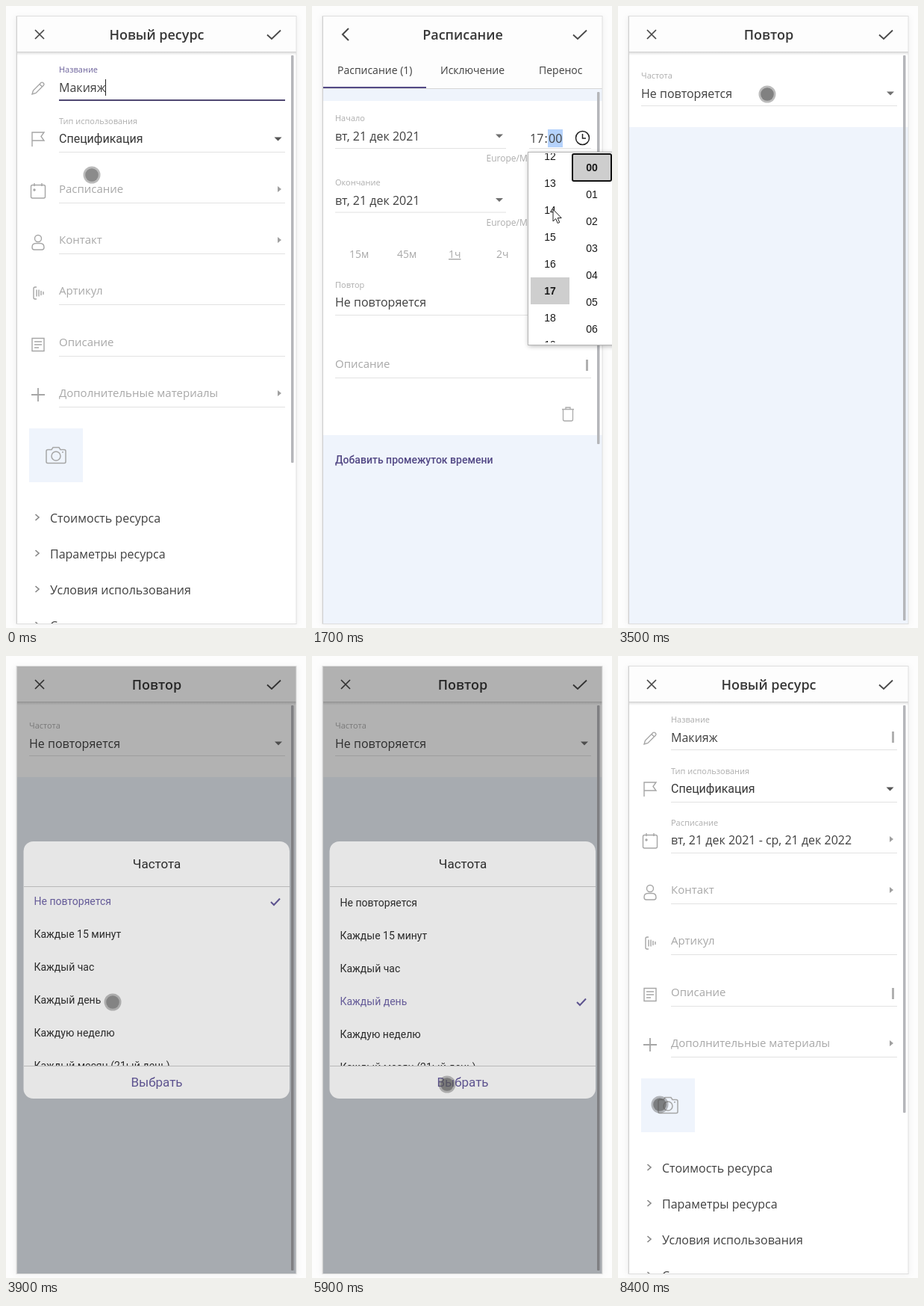
An HTML page that plays this animation: 402 px wide and 832 px high, repeating every 8600 ms.

```html
<!DOCTYPE html>
<html lang="ru">
<head>
<meta charset="utf-8">
<style>
html, body { margin: 0; width: 100%; height: 100%; overflow: hidden; background: #fdfdfd; }
svg { display: block; width: 402px; height: 832px; }
text { white-space: pre; }
</style>
</head>
<body>
<svg id="stage" viewBox="0 0 402 832">
  <defs>
    <clipPath id="card"><rect x="14" y="14" width="375" height="812"/></clipPath>
    <clipPath id="list"><rect x="24" y="309" width="356" height="239"/></clipPath>
    <linearGradient id="fade" x2="0" y2="1">
      <stop offset="0" stop-color="#000" stop-opacity=".12"/>
      <stop offset="1" stop-color="#000" stop-opacity="0"/>
    </linearGradient>
    <filter id="soft" x="-20%" y="-20%" width="140%" height="140%"><feGaussianBlur stdDeviation="5"/></filter>
    <filter id="drop" x="-20%" y="-20%" width="140%" height="140%"><feGaussianBlur stdDeviation="3"/></filter>
  </defs>
  <rect x="12" y="14" width="379" height="814" fill="#000" opacity=".045" filter="url(#soft)"/>
  <g id="scene"></g>
</svg>
<script>
const LOOP = 8600, STEP = 100;
const scene = document.getElementById('scene');
const OPEN = "'Open Sans', sans-serif", ROBOTO = 'Roboto, sans-serif', ARIAL = "'Liberation Sans', Arial, sans-serif";
const INK = '#404040', MUTED = '#a8a8a8', LABEL = '#adadad', ICON = '#a6a6a6', RULE = '#e2e2e2';
const PURPLE = '#524885', PALE = '#eff4fc';

// ---- drawing helpers ----
const rect = (x, y, w, h, fill, more = '') => `<rect x="${x}" y="${y}" width="${w}" height="${h}" fill="${fill}" ${more}/>`;
const path = (d, color, width = 1.4, more = '') =>
  `<path d="${d}" fill="none" stroke="${color}" stroke-width="${width}" ${more}/>`;
const shape = (d, fill) => `<path d="${d}" fill="${fill}"/>`;
const text = (x, y, s, size = 16, fill = INK, font = OPEN, more = '') =>
  `<text x="${x}" y="${y}" font-size="${size}" fill="${fill}" font-family="${font}" ${more}>${s}</text>`;
const mid = 'text-anchor="middle"';
const rule = (y, x1 = 71, x2 = 374) => rect(x1, y, x2 - x1, 1, RULE);
const label = (x, y, s, fill = LABEL) => text(x, y, s, 11, fill);
const down = (x, y, fill = '#707070') => shape(`M${x - 5} ${y - 2.5}h10l-5 5z`, fill);
const right = y => shape(`M364 ${y - 4}l5 4l-5 4z`, '#a0a0a0');
const bar = y => rect(367, y, 3, 15, '#b0b0b0');
const scrollbar = (y1, y2) => rect(382, y1, 3.5, y2 - y1, '#b5b6ba', 'rx="1"');
const at = (x, y, body) => `<g transform="translate(${x} ${y})">${body}</g>`;

// Linear interpolation through [time, value, value...] keys
function track(keys, t) {
  let i = keys.findIndex(k => k[0] > t);
  if (i < 0) return keys[keys.length - 1].slice(1);
  if (i === 0) return keys[0].slice(1);
  const a = keys[i - 1], b = keys[i], p = (t - a[0]) / (b[0] - a[0]);
  return a.slice(1).map((v, n) => v + (b[n + 1] - v) * p);
}

function header(title, back) {
  const left = back ? 'M49 30L41 38L49 46' : 'M39 32L51 44M51 32L39 44';
  return rect(14, 14, 375, 48, '#fdfdfd') +
    path(left, '#484848', back ? 2 : 1.7) +
    path('M350 38.5L356 44L368 32.5', '#484848', 1.8) +
    text(202, 45, title, 18, '#383838', OPEN, 'font-weight="600" ' + mid);
}
const headerEdge = () => rect(14, 61, 375, 1, '#d2d2d2') + rect(14, 62, 375, 4, 'url(#fade)');

// ---- icons, drawn around 0,0 ----
const icons = {
  pencil: path('M-8 8L-6.5 3L4 -7.5Q5.5 -8.5 7 -7L7.5 -6.500Q8.500 -5 7.500 -4L-3 6.500ZM2 -5.500L5.500 -2', ICON),
  flag: path('M-8 10V-9H8L4 -3.500L8 2H-8', ICON),
  calendar: path('M-7.500 -7.500H7.500Q9.500 -7.500 9.500 -5.500V8Q9.500 10 7.500 10H-7.500Q-9.500 10 -9.500 8V-5.500Q-9.500 -7.500 -7.500 -7.500ZM-5 -10V-6M5 -10V-6', ICON) +
    '<circle cx="-5" cy="-1" r="1.700" fill="#a6a6a6"/>',
  person: '<circle cy="-5" r="4.500" fill="none" stroke="#a6a6a6" stroke-width="1.4"/>' +
    path('M-8 7Q-8 1.500 -3 1.500H3Q8 1.500 8 7Q8 10 5 10H-5Q-8 10 -8 7Z', ICON),
  code: path('M-2 -8H-4Q-6 -8 -6 -6V6Q-6 8 -4 8H-2M-2 -4.500V4.500M1 -4.500V4.500M4 -3V3M7 -2V2', ICON),
  note: path('M-8 -8.500H8V8.500H-8ZM-5 -4H5M-5 0H5M-5 4H1', ICON),
  plus: path('M-9 0H9M0 -9V9', ICON, 1.8),
  camera: path('M-11 -7.500H-6L-4 -10.500H4L6 -7.500H11Q13 -7.500 13 -5.500V8.500Q13 10.500 11 10.500H-11Q-13 10.500 -13 8.500V-5.500Q-13 -7.500 -11 -7.500Z', ICON, 1.5) +
    '<circle cy="1" r="6" fill="none" stroke="#a6a6a6" stroke-width="1.5"/>' + rect(8, -5, 2, 1.5, ICON),
  trash: path('M-8 -6.500H8M-3 -6.500V-9H3V-6.500M-6.500 -6.500V7Q-6.500 9 -4.500 9H4.500Q6.500 9 6.500 7V-6.500', '#ababab', 1.3),
  clock: '<circle r="9" fill="none" stroke="#222" stroke-width="1.500"/>' + path('M0 -5.500V0.500H4.500', '#222', 1.5)
};

// ---- screens ----
function formScreen(filled) {
  let s = rect(14, 14, 375, 812, '#fff') + header('Новый ресурс') + headerEdge();
  const marks = { pencil: 110, flag: 178, calendar: 247, person: 316, code: 384, note: 453, plus: 520 };
  for (const k in marks) s += at(43, marks[k], icons[k]);

  s += label(71, 89, 'Название', filled ? LABEL : '#6d639c') + text(71, 115, 'Макияж');
  s += filled ? rule(125) + bar(101) + bar(444)
    : rect(71, 125, 303, 2, '#4f4772') + rect(133, 98, 1, 22, '#222');
  s += label(71, 158, 'Тип использования') + text(71, 183, 'Спецификация', 16, '#383838', ROBOTO) + down(364.5, 178, '#555');
  s += filled ? label(71, 227, 'Расписание') + text(71, 252, 'вт, 21 дек 2021 - ср, 21 дек 2022')
    : text(71, 250, 'Расписание', 15, MUTED);
  const blanks = { 'Контакт': 318, 'Артикул': 386, 'Описание': 455, 'Дополнительные материалы': 523 };
  for (const k in blanks) s += text(71, blanks[k], k, 15, MUTED);
  s += [195, 263, 331, 399, 468, 536].map(y => rule(y)).join('');
  s += [245, 313, 518].map(right).join('');

  s += rect(31, 565, 72, 72, PALE) + at(67, 601, icons.camera);
  ['Стоимость ресурса', 'Параметры ресурса', 'Условия использования', 'Состав'].forEach((name, i) => {
    const y = 685 + i * 48;
    s += path(`M39.500 ${y - 5}l4.500 4l-4.500 4`, '#868686', 1.6) + text(59, y + 5.5, name);
  });
  return s + scrollbar(66, 611);
}

const two = n => String(n).padStart(2, '0');

function timeRow(y, title, hour, lit) {
  let s = label(31, y - 20, title) + text(31, y + 6, 'вт, 21 дек 2021') + down(251, y);
  if (lit) s += rect(lit === 'h' ? 291 : 316, y - 9, 20, 24, '#b5d2fb');
  s += text(292, y + 8.5, two(hour)) + text(311.5, y + 8.5, ':') + text(317, y + 8.5, '00');
  s += at(362.5, y + 2.5, icons.clock) + rule(y + 16, 31, 260) + rule(y + 16, 291);
  return s + text(374, y + 34, 'Europe/Moscow (GMT+3)', 12, LABEL, OPEN, 'text-anchor="end"');
}

function scheduleScreen(o) {
  let s = rect(14, 14, 375, 812, PALE) + rect(14, 61, 375, 50, '#fdfdfd') + header('Расписание', true);
  s += text(34, 91, 'Расписание (1)', 14) + text(172, 91, 'Исключение', 14) + text(304, 91, 'Перенос', 14);
  s += rect(14, 110, 375, 1, '#d6d6d6') + rect(15, 108, 138, 2, PURPLE);
  s += rect(14, 127, 375, 447, '#fff');
  s += timeRow(174, 'Начало', o.start, o.litStart) + timeRow(259.5, 'Окончание', o.end, o.litEnd);
  [['15м', 50], ['45м', 114], ['1ч', 183], ['2ч', 247], ['Весь день', 303]].forEach(([name, x]) => {
    const line = name === '1ч' && o.end - o.start === 1 ? 'text-decoration="underline"' : '';
    s += text(x, 337, name, 14, MUTED, OPEN, line);
  });
  s += label(31, 377, 'Повтор') + text(31, 402, o.repeat) + right(395) + rule(413, 31);
  s += text(31, 484, 'Описание', 15, MUTED) + bar(473) + rule(497, 31) + at(343, 546, icons.trash);
  s += text(31, 612, 'Добавить промежуток времени', 14, PURPLE, ROBOTO, 'font-weight="500"');
  return s + scrollbar(115, o.picker ? 586 : 760);
}

function picker(top, hour, first, scroll, focus) {
  const cell = (x, n, y, on, ring) => {
    const frame = on ? rect(x - 26, y - 18, 52, 36, '#cecece', ring ? 'stroke="#111" stroke-width="2" rx="2"' : '') : '';
    return frame + text(x, y + 5, two(n), 14, '#1a1a1a', ARIAL, mid + (on ? ' font-weight="700"' : ''));
  };
  let s = rect(290, top + 2, 122, 258, '#000', 'opacity=".3" filter="url(#drop)"') +
    rect(289.5, top + 0.5, 122, 258, '#fff', 'stroke="#b5b5b5"') +
    `<clipPath id="wheel"><rect x="290" y="${top + 2}" width="112" height="253"/></clipPath><g clip-path="url(#wheel)">`;
  for (let i = -12; i < 8; i++) {
    const y = top + 21 + i * 36 + scroll;
    if (y < top - 20 || y > top + 280) continue;
    const n = (first + i + 24) % 24;
    s += cell(319, n, y, n === hour, focus === 'h');
  }
  for (let i = 0; i < 7; i++) s += cell(375, i, top + 21 + i * 36, i === 0, focus === 'm');
  return s + '</g>';
}

const repeatScreen = value => rect(14, 14, 375, 812, PALE) + rect(14, 61, 375, 101, '#fff') +
  header('Повтор') + headerEdge() + label(31, 97, 'Частота') + text(31, 122.5, value) +
  down(365, 117) + rule(133, 31) + scrollbar(66, 822);

function dialog(chosen, shift) {
  let s = rect(14, 14, 375, 812, '#000', 'opacity=".3"') + rect(23.5, 248, 356.500, 344, '#e6e6e6', 'rx="13"');
  s += text(202, 284, 'Частота', 17, '#2c2c2c', ROBOTO, mid) + rect(24, 308, 356, 1, '#b9b9b9');
  s += '<g clip-path="url(#list)">';
  ['Не повторяется', 'Каждые 15 минут', 'Каждый час', 'Каждый день', 'Каждую неделю', 'Каждый месяц (21ый день)'].forEach((name, i) => {
    const y = 330 + i * 44 + shift, on = i === chosen;
    s += text(37.5, y + 5, name, 14, on ? '#655b98' : '#2b2b2b', ROBOTO);
    if (on) s += path(`M355 ${y + 1}l4 4l8 -8.500`, '#5d538f', 2);
  });
  return s + '</g>' + rect(24, 548, 356, 1, '#b9b9b9') + text(202, 576, 'Выбрать', 17, '#5d538f', ROBOTO, mid);
}

// ---- pointer ----
const route = [
  [0, 115, 226], [200, 116, 243], [400, 120, 245], [900, 290, 200], [1100, 361, 177], [1300, 361, 178],
  [1400, 345, 225], [1500, 324, 270], [1700, 323, 272], [2000, 323, 274], [2100, 310, 262], [2200, 280, 240],
  [2400, 361, 262], [2500, 361, 264], [2700, 330, 420], [2900, 324, 485], [3000, 324, 486],
  [3100, 230, 405], [3200, 200, 398], [3300, 198, 390], [3500, 200, 118], [3600, 200, 124], [3900, 143, 463],
  [4500, 144, 463], [5400, 178, 565], [5900, 181, 573], [6000, 182, 570], [6200, 310, 200], [6300, 352, 90],
  [6400, 359, 62], [6500, 359, 40], [6700, 359, 40], [6900, 174.5, 450], [7000, 200, 400], [7300, 359, 42],
  [7500, 357, 40], [7600, 355, 45], [7900, 175, 391], [8100, 175, 391], [8200, 150, 480], [8300, 88, 645], [8400, 56, 600]
];
const taps = [200, 1200, 2400, 3200, 3500, 4300, 5900, 6500, 7400, 8400];
const wheel = [[1500, 0], [1600, 70], [1700, 165], [1800, 260], [1900, 345]];

function pointer(t, arrow) {
  const [x, y] = track(route, t);
  if (arrow) return at(x, y, '<path d="M0 0V16L3.700 12.500L6.200 18.500L8.700 17.400L6.200 11.500H11.200Z" fill="#fff" stroke="#222" stroke-width="1"/>');
  const alpha = taps.includes(t) ? 0.72 : 0.62;
  return `<circle cx="${x}" cy="${y}" r="11.500" fill="#555" opacity=".4"/>` +
    `<circle cx="${x}" cy="${y}" r="8.800" fill="#555" opacity="${alpha - 0.15}"/>`;
}

function render(t) {
  const within = (a, b) => t >= a && t < b;
  const first = within(1300, 2200), second = within(2500, 3100);
  const start = t < 2000 ? 17 : 9, end = t < 3000 ? 18 : 23;
  const focus = t < 2000 ? 'm' : 'h';
  let page;
  if (t < 400) page = formScreen(false);
  else if (t >= 7500) page = formScreen(true);
  else if (within(3300, 6700)) {
    page = repeatScreen(t < 6000 ? 'Не повторяется' : 'Каждый день');
    if (within(3600, 6000)) page += t < 4300 ? dialog(0, -2) : dialog(3, 0);
  } else page = scheduleScreen({
    start, end, picker: first || second,
    litStart: first && focus, litEnd: second && 'h',
    repeat: t < 6700 ? 'Не повторяется' : 'Каждый день'
  });
  let s = `<g clip-path="url(#card)">${page}</g>` +
    rect(14, 13.5, 375, 813, 'none', 'stroke="#dedede"') + rect(14, 14, 1, 812, '#d0d0d0');
  if (first) s += picker(195, start, 17, track(wheel, t)[0], focus);
  if (second) s += picker(281.5, end, 18, 0, 'h');
  scene.innerHTML = s + pointer(t, first || second);
}

const origin = performance.now();
let shown = -1;
function tick() {
  const t = Math.floor(((performance.now() - origin) % LOOP) / STEP) * STEP;
  if (t !== shown) render(shown = t);
  requestAnimationFrame(tick);
}
tick();
</script>
</body>
</html>
```
